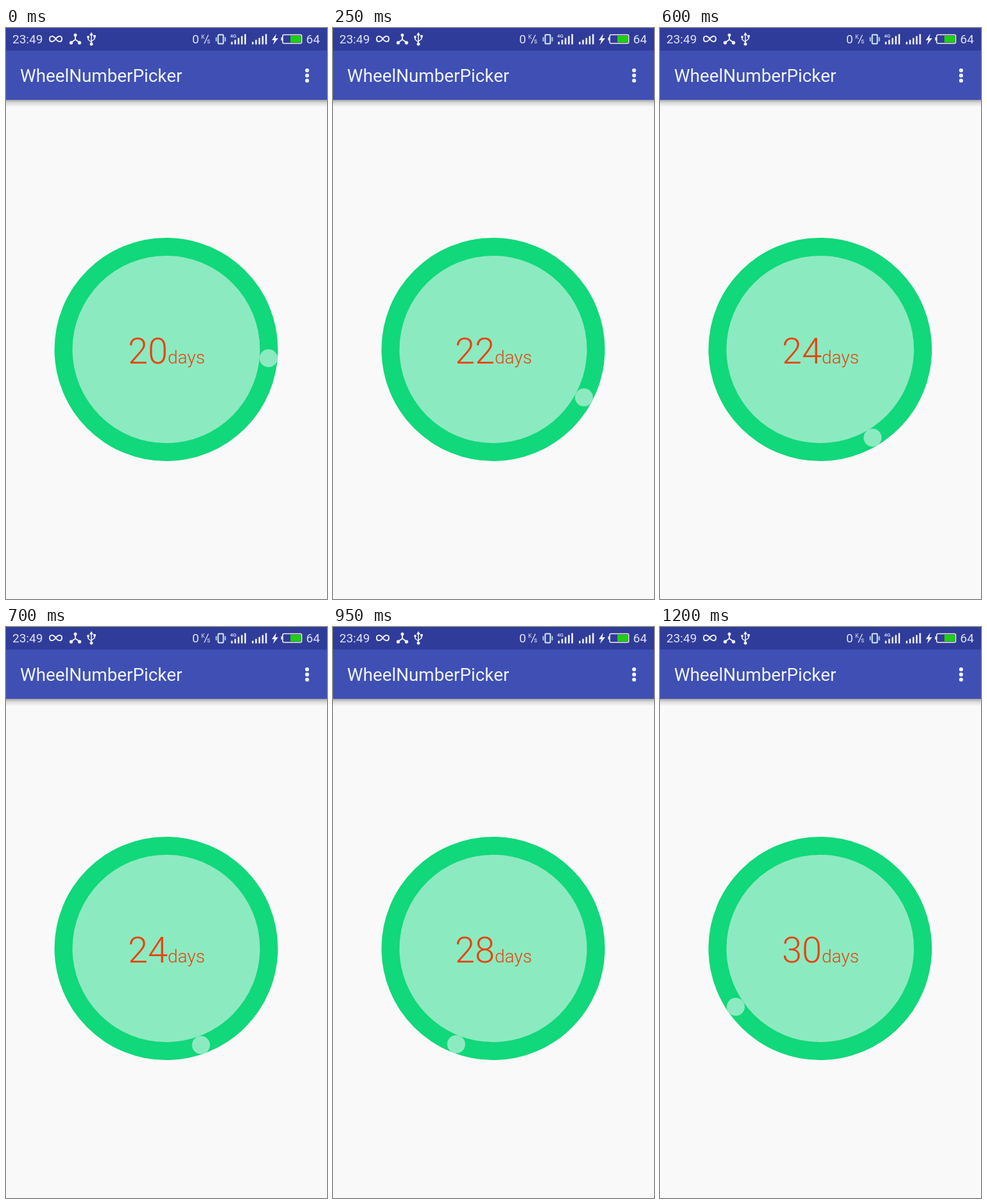
An HTML page that plays this animation: 500 px wide and 890 px high, repeating every 1250 ms.

```html
<!DOCTYPE html>
<html lang="en">
<head>
<meta charset="utf-8">
<title>Wheel picker</title>
<style>
  html, body { margin: 0; width: 100%; height: 100%; overflow: hidden; background: #f9f9f9; }
  svg { display: block; width: 500px; height: 890px; font-family: Roboto, sans-serif; }
  .status { font-size: 19px; fill: #dfe2f4; }
  .line { fill: none; stroke: #eef0fb; stroke-width: 2; stroke-linecap: round; stroke-linejoin: round; }
  .solid { fill: #eef0fb; }
  .value { font-weight: 300; fill: #e8430f; }
</style>
</head>
<body>
<svg viewBox="0 0 500 890">
  <defs>
    <linearGradient id="shade" x2="0" y2="1">
      <stop offset="0" stop-color="#000" stop-opacity=".34"/>
      <stop offset=".4" stop-color="#000" stop-opacity=".13"/>
      <stop offset="1" stop-color="#000" stop-opacity="0"/>
    </linearGradient>
  </defs>

  <rect width="500" height="890" fill="#f9f9f9"/>
  <rect y="112" width="500" height="11" fill="url(#shade)"/>
  <rect y="34" width="500" height="78" fill="#3f4fb4"/>
  <rect width="500" height="35" fill="#303c9a"/>

  <g class="status">
    <text x="10" y="24">23:49</text>
    <text x="290" y="24">0</text>
    <text x="304" y="17" font-size="9">K</text>
    <text x="313" y="24" font-size="10">s</text>
    <text x="349" y="15" font-size="8" font-weight="500">4G</text>
    <text x="467.500" y="24">64</text>
  </g>

  <g class="line">
    <path d="M77.500 17C73 11 68 12 68 17s5 6 9.500 0 9.500-5 9.500 0-5 6-9.500 0"/>
    <path d="M108 11v7l-7 5m7-5 7 5"/>
    <path d="M133 9v16M128 14v4l5 4m5-9v4l-5 4" stroke-width="1.600"/>
    <path d="M309 24l6-13" stroke-width="1.200"/>
    <rect x="330.500" y="10.500" width="8" height="14" rx="1" stroke="#d5e8ef"/>
    <path d="M327.500 15v5M341.500 15v5" stroke="#a8d6e0"/>
    <rect x="431" y="10.500" width="29.500" height="13.500" rx="2" stroke-width="1.600" stroke="#f3eedc"/>
  </g>
  <g class="solid">
    <circle cx="108" cy="11" r="2.500"/>
    <circle cx="101.500" cy="23" r="2.700"/>
    <circle cx="114.500" cy="23" r="2.700"/>
    <path d="M133 6.500l3 5h-6z"/>
    <circle cx="133" cy="25" r="2.500"/>
    <circle cx="128" cy="14" r="1.900"/>
    <path d="M136.200 11h3.600v3.600h-3.600z"/>
    <path d="M421 9l-7 10h4l-2 7 8-10h-4.500z"/>
    <path id="bars"/>
    <rect x="428.500" y="14.500" width="2" height="5"/>
    <g id="dots"></g>
  </g>
  <rect x="443" y="12" width="16.500" height="10.500" fill="#1fd011"/>

  <text x="22" y="84" font-size="27.800" fill="#f1f4fb">WheelNumberPicker</text>

  <circle cx="249.500" cy="501" r="174" fill="#11d87a"/>
  <circle cx="249.500" cy="501" r="146" fill="#8ceac0"/>
  <circle id="knob" r="14" fill="#8ceac0"/>
  <g class="value">
    <text id="count" x="190" y="523" font-size="56">20</text>
    <text x="252" y="523" font-size="28">days</text>
  </g>
</svg>
<script>
const $ = id => document.getElementById(id);
const LOOP = 1250, TICK = 50;

// Drag path: [time in ms, clockwise angle in degrees from the right]
const drag = [[0, 4.9], [250, 27.9], [450, 50.1], [550, 57.2], [600, 59.3],
              [800, 85.3], [950, 111.1], [1100, 143], [1200, 145.3]];
const FIRST = 26, STEP = 26;

const rate = i => (drag[i + 1][1] - drag[i][1]) / (drag[i + 1][0] - drag[i][0]);

// Harmonic mean of neighbouring rates keeps the curve from overshooting
function slope(i) {
  if (i === 0) return rate(0);
  if (i === drag.length - 1) return rate(i - 1);
  const a = rate(i - 1), b = rate(i);
  return 2 * a * b / (a + b);
}

function angleAt(t) {
  let i = 0;
  while (i < drag.length - 2 && t >= drag[i + 1][0]) i++;
  const [t0, a] = drag[i], [t1, b] = drag[i + 1];
  const h = t1 - t0, u = (t - t0) / h, v = 1 - u;
  return a * v * v * (1 + 2 * u) + b * u * u * (3 - 2 * u)
    + h * u * v * (v * slope(i) - u * slope(i + 1));
}

function draw(now) {
  const t = Math.floor(now % LOOP / TICK) * TICK;
  const deg = angleAt(t), rad = deg * Math.PI / 180;
  $('knob').setAttribute('cx', 249.5 + 160 * Math.cos(rad));
  $('knob').setAttribute('cy', 501 + 160 * Math.sin(rad));
  $('count').textContent = 20 + 2 * Math.floor((deg - FIRST) / STEP + 1);
}

const bars = (x, heights) =>
  heights.map((h, i) => `M${x + i * 5.2} ${25.5 - h}h2.6v${h}h-2.6z`).join('');
$('bars').setAttribute('d',
  bars(350.5, [4, 7, 10, 13, 16]) + bars(383, [4, 7, 10, 13, 16]));
$('dots').innerHTML = [66, 74, 82].map(y => `<circle cx="469" cy="${y}" r="3.1"/>`).join('');

let start;
function loop(now) {
  start ??= now;
  draw(now - start);
  requestAnimationFrame(loop);
}
draw(0);
requestAnimationFrame(loop);
</script>
</body>
</html>
```
